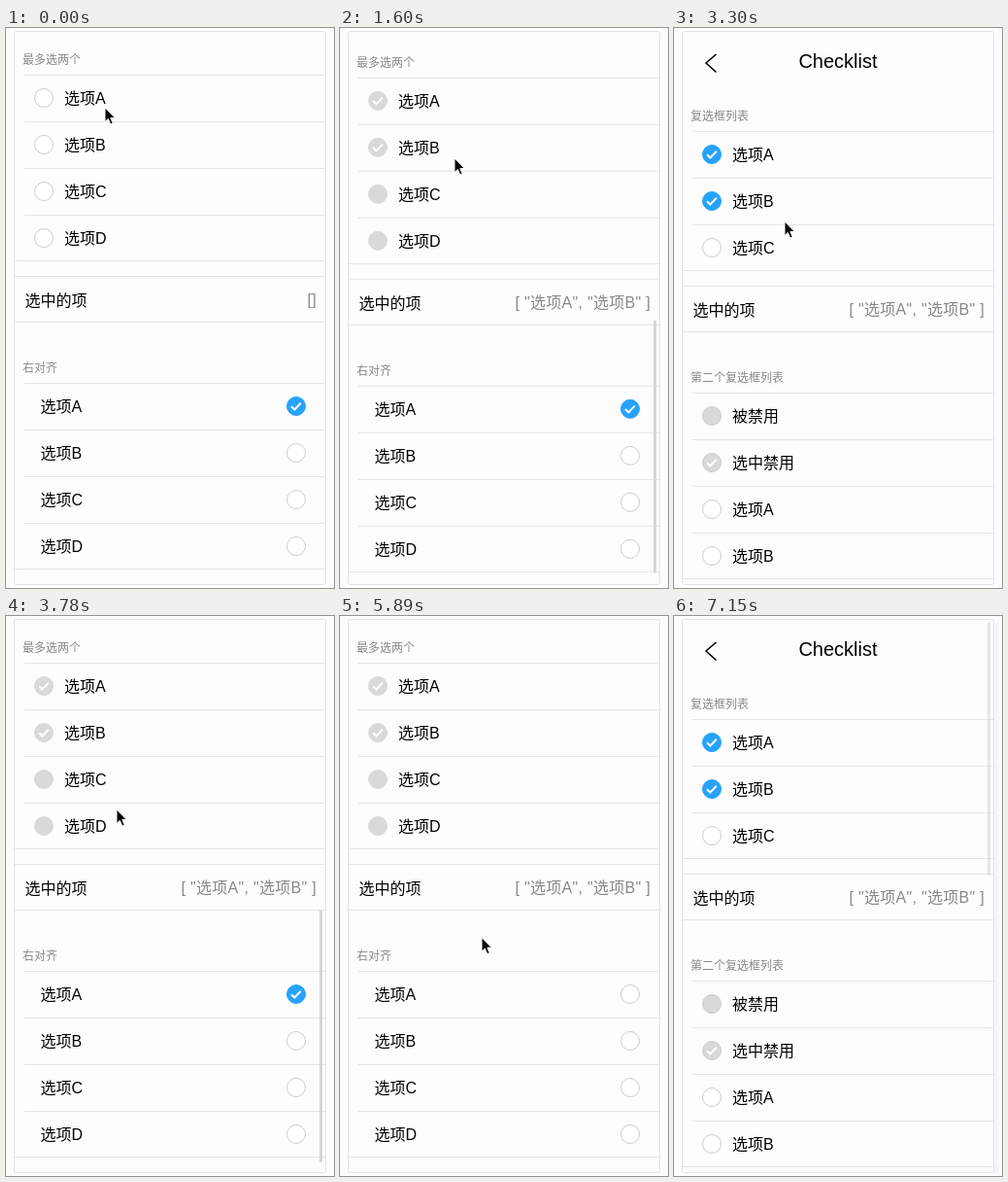
Recreate the animation shown at these times as an HTML page. Size 338 by 576 pixels, loop 7760 ms.

```html
<!DOCTYPE html>
<html lang="zh-CN">
<head>
<meta charset="utf-8">
<title>Checklist</title>
<style>
html, body { margin: 0; width: 100%; height: 100%; overflow: hidden; background: #fdfdfd; }
svg { display: block; }
text { font: 16px "Liberation Sans", "Noto Sans CJK SC", "Noto Sans CJK", sans-serif; fill: #000; white-space: pre; }
.title { font-size: 20px; text-anchor: middle; }
.head { font-size: 12px; fill: #888; }
.value { fill: #888; text-anchor: end; letter-spacing: .3px; }
.tick { fill: none; stroke: #fff; stroke-width: 2; }
</style>
</head>
<body>
<svg id="stage" width="338" height="576" viewBox="0 0 338 576">
  <defs><clipPath id="view"><rect x="9" y="4" width="320" height="568"/></clipPath></defs>
  <rect id="strip" x="330" y="7" width="5" height="567" fill="#f6f6f6"/>
  <rect x="8.5" y="3.5" width="321" height="569" rx="2" fill="#fdfdfd" stroke="#e4e4e4"/>
  <g clip-path="url(#view)">
    <g id="page">
      <path d="M43.5 27L33 36L43.5 45.5" fill="none" stroke="#000" stroke-width="1.6"/>
      <text class="title" x="169" y="41">Checklist</text>
    </g>
    <rect id="thumb" x="323" width="3" height="260" rx="1" fill="#d6d6d6"/>
  </g>
  <path id="cursor" d="M0 0V14.5L3.3 11.4L5.7 17L8.2 16L5.8 10.5H10.3Z" fill="#000" stroke="#fff" stroke-width="1"/>
</svg>
<script>
const LOOP = 7760, BOTTOM = 644, GROW = 200;
const $ = id => document.getElementById(id);
const page = $('page');

function add(parent, tag, attrs, text) {
  const node = document.createElementNS('http://www.w3.org/2000/svg', tag);
  for (const key in attrs) node.setAttribute(key, attrs[key]);
  if (text) node.textContent = text;
  return parent.appendChild(node);
}
const set = (node, key, value) => node.setAttribute(key, value);
const line = (x, y) => add(page, 'rect', { x, y, width: 329 - x, height: 1, fill: '#e5e5e5' });
const format = list => list.length ? `[ ${list.map(s => `"${s}"`).join(', ')} ]` : '[]';

// on / off: times at which an item is ticked and unticked; lock: time its circle turns grey
const letters = s => [...s].map(c => ({ label: '选项' + c }));
const groups = [
  { head: '复选框列表', top: 106, items: letters('ABC'), value: true },
  { head: '第二个复选框列表', top: 375, value: true, items: [
    { label: '被禁用', lock: -1, rim: '#ccc' },
    { label: '选中禁用', name: '选中禁用的值', lock: -1, rim: '#ccc', on: -GROW },
    ...letters('AB')] },
  { head: '最多选两个', top: 692, items: letters('ABCD'), value: true },
  { head: '右对齐', top: 1009, items: letters('ABCD'), right: true }
];
const [first, , limited, aligned] = groups.map(g => g.items);
first[0].on = 2530;
first[1].on = 3040;
limited[0].on = 570;
limited[1].on = 1025;
limited.forEach(item => item.lock = 1025);
Object.assign(aligned[0], { on: -GROW, off: 4785 });

for (const g of groups) {
  const end = g.top + 48 * g.items.length;
  add(page, 'text', { class: 'head', x: 17, y: g.top - 11 }, g.head);
  g.items.forEach((item, i) => {
    const y = g.top + 48 * i;
    line(19, y);
    const mark = add(page, 'g', { transform: `translate(${g.right ? 299 : 39} ${y + 24})` });
    item.dot = add(mark, 'circle', { r: 9.5 });
    item.tick = add(mark, 'path', { class: 'tick', d: 'M-5 .2L-1.7 3.5L4.8 -3.2' });
    add(page, 'text', { x: g.right ? 35.5 : 60, y: y + 30 }, item.label);
  });
  line(9, end - 1);
  if (g.value) {
    line(9, end + 15);
    line(9, end + 62);
    add(page, 'text', { x: 19.5, y: end + 46 }, '选中的项');
    g.out = add(page, 'text', { class: 'value', x: 320, y: end + 45 });
  }
}

// Keys are [time, ...values]; a repeated time makes a hard change
const scrollKeys = [[0, BOTTOM], [1590, BOTTOM], [1690, 560], [1985, 560], [1985, 0],
  [3360, 0], [3450, 80], [3780, 80], [3780, BOTTOM], [6245, BOTTOM], [6285, 583], [6585, 583], [6585, 0]];
const thumbKeys = [[0, 0], [1590, 0], [1590, 1], [2160, 1], [2450, 0], [3360, 0], [3360, 1],
  [4000, 1], [4300, 0], [6245, 0], [6245, 1], [6650, 1], [6940, .6]];
const cursorKeys = [[0, 102, 82], [30, 102, 82], [300, 109, 90], [570, 109, 90], [800, 118, 134],
  [1690, 118, 134], [1985, 119, 166], [2160, 119, 166], [2450, 113, 134], [2600, 113, 134],
  [2840, 114, 180], [3060, 114, 180], [3290, 114, 199], [3780, 114, 199], [4340, 94, 402],
  [5000, 94, 402], [5120, 112, 432], [5480, 112, 432], [6140, 162, 283], [6590, 162, 283],
  [6940, 332, 562], [7080, 332, 562], [7145, 340, 577]];

function at(keys, t) {
  let i = keys.length - 1;
  while (i && keys[i][0] > t) i--;
  const a = keys[i], b = keys[i + 1] || a;
  const p = b === a ? 0 : (t - a[0]) / (b[0] - a[0]);
  const ease = p * p * (3 - 2 * p);
  return a.slice(1).map((v, k) => v + (b[k + 1] - v) * ease);
}

function draw(t) {
  for (const g of groups) {
    const chosen = [];
    for (const item of g.items) {
      const { on = Infinity, off = Infinity, lock = Infinity } = item;
      const checked = t >= on && t < off, locked = t >= lock;
      if (checked) chosen.push(item.name || item.label);
      set(item.dot, 'fill', locked ? '#d9d9d9' : checked ? '#26a2ff' : '#fff');
      set(item.dot, 'stroke', locked ? item.rim || '#d9d9d9' : checked ? '#26a2ff' : '#ccc');
      set(item.tick, 'transform', `scale(${checked ? Math.min(1, (t - on) / GROW) : 0})`);
      set(item.tick, 'visibility', checked && t - on > 10 ? 'visible' : 'hidden');
    }
    if (g.out) g.out.textContent = format(chosen);
  }
  const [scroll] = at(scrollKeys, t);
  set(page, 'transform', `translate(0 ${-scroll})`);
  set($('thumb'), 'y', 7 + scroll * 267 / 583);
  set($('thumb'), 'opacity', at(thumbKeys, t)[0]);
  set($('strip'), 'opacity', t >= 6900 ? 1 : 0);
  set($('cursor'), 'transform', `translate(${at(cursorKeys, t).join(' ')})`);
}

const start = performance.now();
function tick() {
  draw((performance.now() - start) % LOOP);
  requestAnimationFrame(tick);
}
tick();
</script>
</body>
</html>
```
